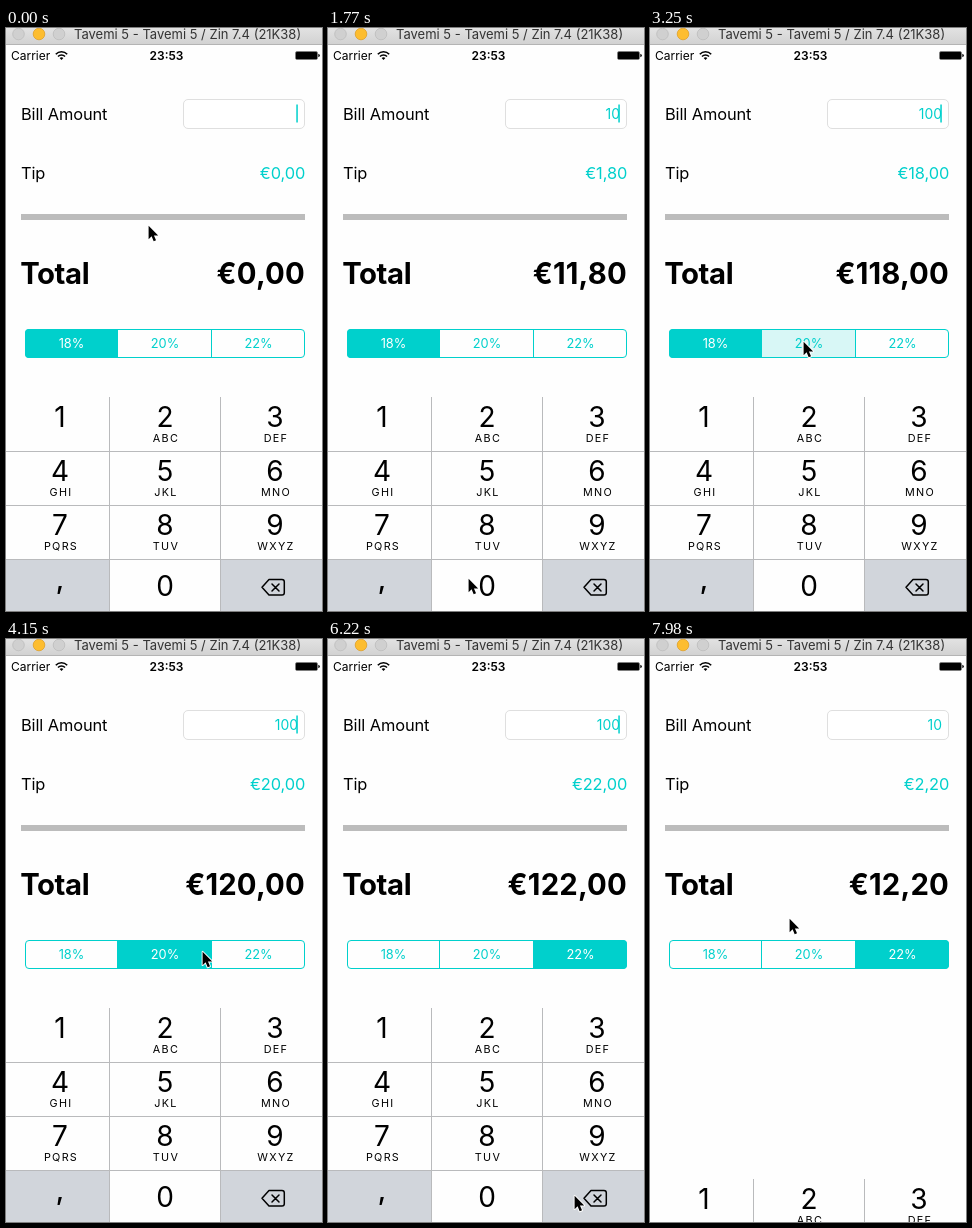
Write an HTML page that moves like this. It is 316 by 583 pixels and loops after 8 s.

```html
<!DOCTYPE html>
<html lang="en">
<head>
<meta charset="utf-8">
<title>Tip calculator</title>
<style>
  html, body { margin: 0; width: 100%; height: 100%; overflow: hidden; background: #fefefe; }
  svg { display: block; width: 316px; height: 583px; font-family: Inter, Roboto, "Liberation Sans", sans-serif; }
  .label { font-size: 16.4px; letter-spacing: -.1px; }
  .total { font-size: 29.3px; font-weight: 700; letter-spacing: -.4px; }
  .sum { letter-spacing: .2px; }
  .key { font-size: 28px; text-anchor: middle; }
  .abc { font-size: 10.8px; letter-spacing: 1.3px; text-anchor: middle; }
  .seg { font-size: 12.8px; text-anchor: middle; }
  .end { text-anchor: end; }
  .teal { fill: #00d0cc; }
</style>
</head>
<body>
<svg id="stage" viewBox="0 0 316 583">
  <defs>
    <linearGradient id="bar" x2="0" y2="1">
      <stop stop-color="#e2e2e2"/><stop offset="1" stop-color="#d2d2d2"/>
    </linearGradient>
    <clipPath id="pill"><rect x="19" y="301" width="280" height="29" rx="4"/></clipPath>
  </defs>
  <rect width="316" height="583" fill="#fefefe"/>

  <rect width="316" height="16" fill="url(#bar)"/>
  <rect y="16" width="316" height="1" fill="#b4b4b4"/>
  <g stroke-width=".8">
    <circle cx="12.5" cy="6" r="5.8" fill="#d0d0d0" stroke="#bdbdbd"/>
    <circle cx="33" cy="6" r="5.8" fill="#fdbd2f" stroke="#e0a028"/>
    <circle cx="53" cy="6" r="5.8" fill="#d0d0d0" stroke="#bdbdbd"/>
  </g>
  <text x="68" y="11" font-size="13" fill="#333">Tavemi 5 - Tavemi 5 / Zin 7.4 (21K38)</text>

  <text x="5" y="32" font-size="12">Carrier</text>
  <g fill="none" stroke="#000" stroke-width="1.6">
    <path d="M49.8 26.2a8 8 0 0 1 11.4 0M52 28.5a4.9 4.9 0 0 1 7 0"/>
  </g>
  <path d="M53.6 30.1a2.7 2.7 0 0 1 3.8 0L55.5 32z"/>
  <text x="160.5" y="32" font-size="12" font-weight="600" text-anchor="middle">23:53</text>
  <rect x="289.5" y="23.5" width="22" height="8" rx="1.5" fill="none" stroke="#000" stroke-opacity=".5"/>
  <rect x="290" y="24" width="21" height="7" rx=".5"/>
  <path d="M312.3 25.7q1.6 .5 1.6 1.8t-1.6 1.8z"/>

  <text class="label" x="15" y="92">Bill Amount</text>
  <rect x="177.5" y="71.5" width="121" height="29" rx="4.5" fill="#fff" stroke="#dfdfdf"/>
  <text id="bill" class="teal end" x="292" y="91" font-size="13.9"></text>
  <rect id="caret" class="teal" x="290.3" y="76.5" width="1.5" height="18"/>

  <text class="label" x="15" y="151">Tip</text>
  <text id="tip" class="label teal end" x="299.2" y="151"></text>
  <rect x="15" y="186" width="284" height="6" fill="#bcbcbc"/>
  <text class="total" x="14.2" y="256">Total</text>
  <text id="total" class="total sum end" x="299" y="256"></text>

  <g id="segments" clip-path="url(#pill)"></g>
  <path d="M111.5 302v27M205.5 302v27" stroke="#00d0cc"/>
  <rect x="19.5" y="301.5" width="279" height="28" rx="3.5" fill="none" stroke="#00d0cc"/>
  <g id="rates"></g>

  <g id="pad"></g>
  <g id="cursor">
    <path transform="translate(.6 .8) scale(.94)" d="M0 0V14.2L3.2 11.2 5.4 16.5 7.9 15.5 5.7 10.3H10.2Z" stroke="#fff" stroke-width="2" paint-order="stroke" stroke-linejoin="round"/>
  </g>
</svg>
<script>
const $ = id => document.getElementById(id);

function add(parent, tag, attrs, text = '') {
  const el = document.createElementNS('http://www.w3.org/2000/svg', tag);
  for (const name in attrs) el.setAttribute(name, attrs[name]);
  el.textContent = text;
  return parent.appendChild(el);
}

const LOOP = 8000, TICK = 147.8;
const TEAL = '#00d0cc', GREY = '#d1d5db', WHITE = '#fefefe';
const RATES = [18, 20, 22];
const colX = [0, 104, 215, 316], midX = [54, 159, 269];

// Segmented control
const segX = [19, 112, 206, 299];
const segs = RATES.map((rate, i) => ({
  box: add($('segments'), 'rect', { x: segX[i], y: 301, width: segX[i + 1] - segX[i], height: 29 }),
  text: add($('rates'), 'text', { class: 'seg', x: [65.5, 159, 252.5][i], y: 320 }, rate + '%')
}));

// Keypad
const pad = $('pad');
const letters = ['', 'ABC', 'DEF', 'GHI', 'JKL', 'MNO', 'PQRS', 'TUV', 'WXYZ'];
const keys = {};
['1', '2', '3', '4', '5', '6', '7', '8', '9', ',', '0', 'del'].forEach((name, i) => {
  const col = i % 3, row = Math.floor(i / 3), y = 369 + row * 54;
  const rest = name === ',' || name === 'del' ? GREY : WHITE;
  const box = add(pad, 'rect', { x: colX[col], y, width: colX[col + 1] - colX[col], height: 54 });
  keys[name] = { box, rest, down: rest === GREY ? WHITE : GREY };
  if (name === 'del') return;
  const comma = name === ',';
  add(pad, 'text', {
    class: 'key', x: midX[col], y: comma ? 560.5 : row === 3 ? 568 : y + 30,
    'font-weight': comma ? 500 : 400
  }, name);
  if (letters[i]) add(pad, 'text', { class: 'abc', x: midX[col] + 1, y: y + 45 }, letters[i]);
});
add(pad, 'path', { d: 'M103.5 369V583M214.5 369V583M0 423.5H316M0 477.5H316M0 531.5H316', stroke: '#b9babc' });
add(pad, 'path', {
  d: 'M263 551.5H276Q278.3 551.5 278.3 553.8V564.7Q278.3 567 276 567H263L256 559.3ZM266 556L273 563M273 556L266 563',
  fill: 'none', stroke: '#000', 'stroke-width': 1.5, 'stroke-linejoin': 'round', 'stroke-linecap': 'round'
});

// Pointer stops: tick, x, y
const route = [
  [0, 142, 197], [5, 54, 394], [6, 54, 394], [7, 82, 440], [8, 132, 525], [10, 140, 550],
  [16, 140, 550], [21, 153, 313], [26, 153, 313], [30, 239, 311],
  [36, 239, 311], [41, 246, 556], [46, 246, 556], [47, 245, 550], [52, 139, 279], [60, 139, 279]
];

function pointer(k) {
  const i = route.findIndex(stop => stop[0] > k);
  const [k0, x0, y0] = route[i - 1], [k1, x1, y1] = route[i];
  const u = (k - k0) / (k1 - k0), e = (1 - Math.cos(Math.PI * u)) / 2;
  return [Math.round(x0 + (x1 - x0) * e), Math.round(y0 + (y1 - y0) * e)];
}

// Value of the last [tick, value] entry reached
const at = (list, k) => list.filter(entry => entry[0] <= k).pop()[1];

const bills = [[0, ''], [6, '1'], [12, '10'], [14, '100'], [44, '10']];
const picks = [[0, 0], [23, 1], [32, 2]];
const presses = { 5: '1', 11: '0', 13: '0', 43: 'del' };
const touches = { 22: 1, 31: 2 };

// Blinks once a second, restarting after each edit
function caretLevel(k) {
  const edit = bills.filter(b => b[0] <= k).pop()[0];
  const p = (k - edit) * TICK / 1000;
  const q = p % 1;
  if (q < .4) return 1;
  return q < .9 ? Math.max(0, (.6 - q) / .2) : (q - .9) / .1;
}

const euro = n => '€' + n.toFixed(2).replace('.', ',');

function draw(t) {
  const k = Math.floor((t + 6) / TICK);
  const closing = k >= 54;
  const bill = at(bills, k), pick = at(picks, k);
  const tip = Number(bill) * RATES[pick] / 100;

  $('bill').textContent = bill;
  $('tip').textContent = euro(tip);
  $('total').textContent = euro(Number(bill) + tip);
  $('caret').setAttribute('opacity', closing ? 0 : caretLevel(k));

  segs.forEach(({ box, text }, i) => {
    box.setAttribute('fill', i === pick ? TEAL : touches[k] === i ? '#d8f7f6' : WHITE);
    text.setAttribute('fill', i === pick ? '#fff' : TEAL);
  });
  for (const name in keys) {
    const key = keys[name];
    key.box.setAttribute('fill', presses[k] === name ? key.down : key.rest);
  }
  pad.setAttribute('transform', `translate(0 ${closing ? 171 : 0})`);
  $('cursor').setAttribute('transform', `translate(${pointer(k)})`);
}

const start = performance.now();
function frame() {
  draw((performance.now() - start) % LOOP);
  requestAnimationFrame(frame);
}
frame();
</script>
</body>
</html>
```
